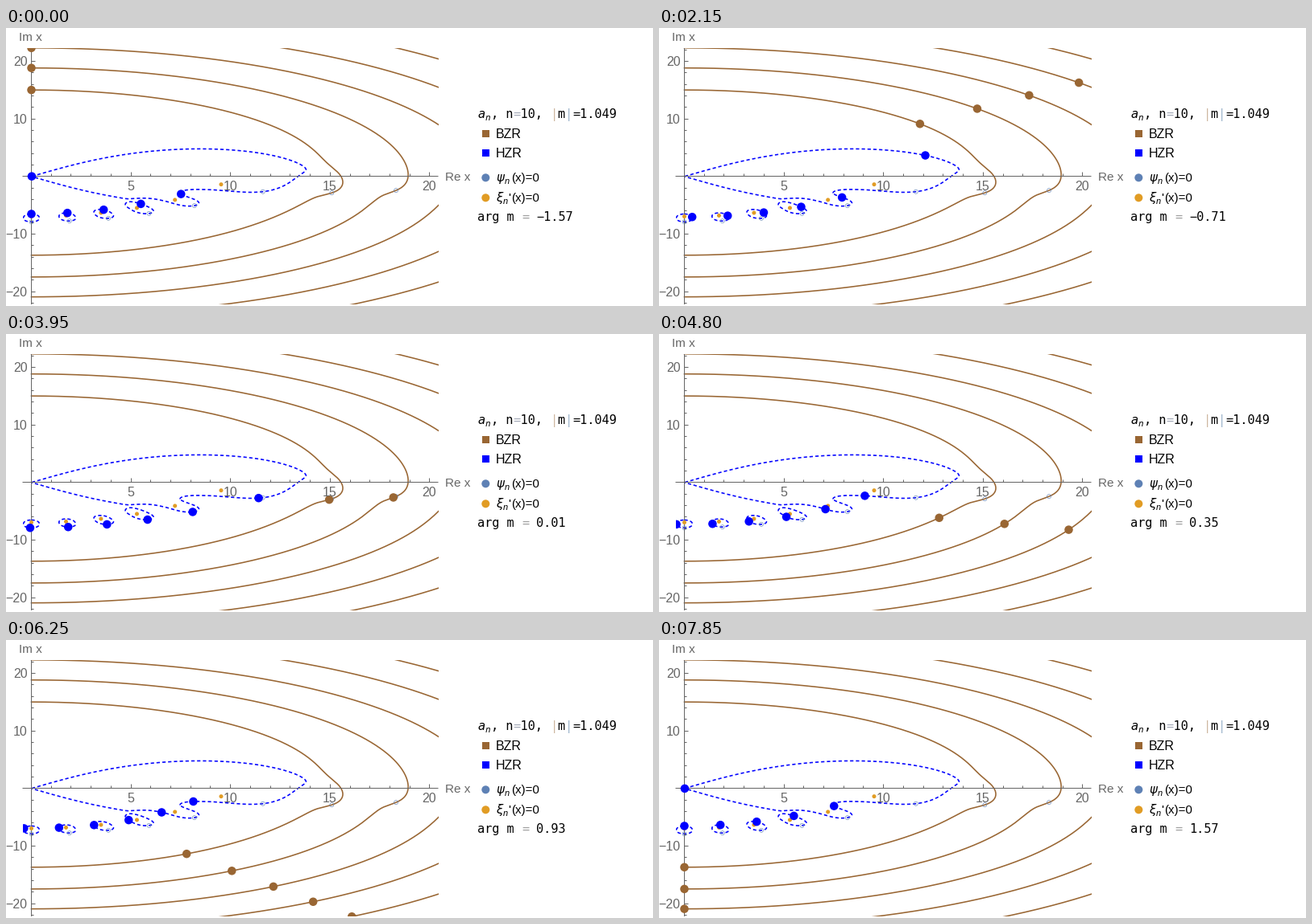
A matplotlib script for the animation above (7900 ms loop, 803 by 346 pixels).

```python
from math import factorial

import matplotlib.pyplot as plt
import numpy as np
from matplotlib.animation import FuncAnimation
from matplotlib.patches import Circle, Rectangle

# Poles of the Mie coefficient a_n in the complex x plane while arg m sweeps
W, H = 803, 346
FRAMES, INTERVAL = 158, 50
N = 10
L = N * (N + 1)
M_ABS = np.sqrt(1.1)

BROWN, BLUE = "#996633", "#0000ff"
RING, ORANGE, GRAY = "#5e81b5", "#e19c24", "#666666"

# ---------- Riccati-Bessel functions (common factors dropped) ----------
TERMS = 64
PSI = np.ones(TERMS)
for k in range(1, TERMS):
    PSI[k] = -PSI[k - 1] / (2 * k * (2 * N + 2 * k + 1))
PSI_D = PSI * (N + 1 + 2 * np.arange(TERMS))
XI = np.array([1j**k * factorial(N + k) / (factorial(k) * factorial(N - k) * 2**k)
               for k in range(N + 1)])
XI_D = -np.arange(N + 1) * XI


def psi(z):
    p = (z * z)[:, None] ** np.arange(TERMS)
    return z ** (N + 1) * (p @ PSI), z**N * (p @ PSI_D)


def xi(x):
    p = (1 / x)[:, None] ** np.arange(N + 1)
    v = p @ XI
    return v, 1j * v + (p @ XI_D) / x


def solve(x, m, steps=3):
    """Newton iteration for m psi(mx) xi'(x) = xi(x) psi'(mx)."""
    for _ in range(steps):
        p, dp = psi(m * x)
        q, dq = xi(x)
        slope = (m * m - 1) * (dp * dq + L * p * q / (m * x * x))
        x = x - (m * p * dq - q * dp) / slope
    return x


def trace(x0, sign, steps=1500):
    """Follow every pole from arg m = 0 to sign * pi/2."""
    s = np.linspace(0, np.pi / 2 - 0.002, steps)
    path = [x0]
    for i in range(1, steps):
        guess = path[-1] if i == 1 else 2 * path[-1] - path[-2]
        arg = sign * np.pi / 2 * np.sin(s[i])
        path.append(solve(guess, M_ABS * np.exp(1j * arg), 2))
    return sign * s, np.array(path)


hzr = [-8j, 1.9 - 7.8j, 3.8 - 7.2j, 5.8 - 6.5j, 8.1 - 5.1j, 11.6 - 2.7j]
bzr = [15 - 3j, 18.3 - 2.5j, 21.5 - 2.35j, 24.7 - 2.25j, 27.8 - 2.2j]
real_m = solve(np.array(hzr + bzr), M_ABS, 25)
s_lo, p_lo = trace(real_m, -1)
s_hi, p_hi = trace(real_m, 1)
s_all = np.concatenate([s_lo[::-1], s_hi[1:]])
paths = np.concatenate([p_lo[::-1], p_hi[1:]])

xi_zeros = np.array([-7j, 1.75 - 6.9j, 3.5 - 6.5j, 5.3 - 5.4j, 7.2 - 4j, 9.55 - 1.4j])
for _ in range(25):
    q, dq = xi(xi_zeros)
    xi_zeros = xi_zeros - dq / ((L / xi_zeros**2 - 1) * q)

args = np.linspace(-np.pi / 2, np.pi / 2, FRAMES)
s_frame = np.arcsin(np.clip(2 * args / np.pi, -1, 1))
poles = np.array([np.interp(s_frame, s_all, c.real) + 1j * np.interp(s_frame, s_all, c.imag)
                  for c in paths.T]).T


# ---------- drawing, in pixels ----------
def px(x):
    return 31.5 + 24.72 * x


def py(y):
    return 184.75 - 7.168 * y


fig = plt.figure(figsize=((W + 0.01) / 72, (H + 0.01) / 72), dpi=72, facecolor="white")
ax = fig.add_axes([0, 0, 1, 1])
ax.set(xlim=(0, W), ylim=(H, 0))
ax.axis("off")
frame = Rectangle((20.5, 25), 516, 319, transform=ax.transData)


def curve(z, **style):
    line, = ax.plot(px(z.real), py(z.imag), lw=1.6, zorder=2, **style)
    line.set_clip_path(frame)


def dots(points, radius, zorder, **style):
    made = []
    for z in points:
        dot = Circle((px(z.real), py(z.imag)), radius, zorder=zorder, **style)
        ax.add_patch(dot)
        dot.set_clip_path(frame)
        made.append(dot)
    return made


def rule(x, y):
    ax.plot(x, y, color=GRAY, lw=1, zorder=3, solid_capstyle="butt", snap=False)


def text(x, y, s, size=16, color="black", font="Liberation Sans", **style):
    return ax.text(x, y, s, fontsize=size, color=color, family=font, zorder=6, **style)


def mono(x, y, s, **style):
    return text(x, y, s, 15.2, font="DejaVu Sans Mono", **style)


for i, path in enumerate(paths.T):
    if i < len(hzr):
        curve(path, color=BLUE, dashes=(2.6, 1.9))
    else:
        curve(path, color=BROWN)

rule((20.5, 536.5), (184.5, 184.5))
rule((31.5, 31.5), (25, 344))
for x in range(1, 21):
    rule((np.floor(px(x)) + 0.5,) * 2, (184.5, 184.5 - (5 if x % 5 == 0 else 3)))
    if x % 5 == 0:
        text(px(x) - 0.5, 202, str(x), color=GRAY, ha="center")
for y in range(-22, 23, 2):
    rule((31.5, 31.5 + (5 if y % 10 == 0 else 3)), (np.floor(py(y)) + 0.5,) * 2)
    if y % 10 == 0 and y:
        text(26.5, py(y) + 5.5, str(y).replace("-", "\u2212"), color=GRAY, ha="right")
text(30.5, 16, "Im x", 15.3, GRAY, ha="center")
text(544.5, 190, "Re x", 15.3, GRAY)

dots(real_m, 2.5, 4, fc="none", ec=RING, lw=0.6)
dots(xi_zeros, 2.5, 4, color=ORANGE, lw=0)
moving = (dots(poles[0, :len(hzr)], 5.25, 5, color=BLUE, lw=0)
          + dots(poles[0, len(hzr):], 5.25, 5, color=BROWN, lw=0))

# legend
mono(585, 112, "a", style="italic")
text(594.5, 115, "n", 11, font="DejaVu Sans Mono", style="italic")
mono(602, 112, ", n 10, ")
mono(629.5, 112, "=", color="#a4aab8")
mono(675.5, 112, "|", color="#cdb7a0")
mono(684.7, 112, "m")
mono(693.8, 112, "|", color="#9fb6cc")
mono(703, 112, "=1.049")
for y, name, color in ((132, "BZR", BROWN), (155.5, "HZR", BLUE)):
    ax.add_patch(Rectangle((590.5, y - 4.5), 9, 9, color=color, lw=0))
    text(608, y + 5, name)
for y, letter, prime, color in ((186, "\u03c8", "", RING), (211, "\u03be", "'", ORANGE)):
    ax.add_patch(Circle((595.3, y + 0.3), 5, color=color, lw=0))
    text(608.5, y + 5, letter, 15, font="DejaVu Sans", style="italic")
    text(619 if not prime else 616.5, y + 8, "n", 11, style="italic")
    text(623.5, y + 5, prime, 15)
    text(627, y + 5, "(x)=0", 15)
mono(585, 240, "arg m")
mono(639.9, 240, "=", color="#a0a0a0")
value = mono(658.2, 240, "")


def draw(i):
    for dot, z in zip(moving, poles[i]):
        dot.center = px(z.real), py(z.imag)
    value.set_text(f"{args[i]:.2f}".replace("-", "\u2212"))
    return *moving, value


anim = FuncAnimation(fig, draw, frames=FRAMES, interval=INTERVAL, repeat=True, repeat_delay=0)
plt.show()
```
